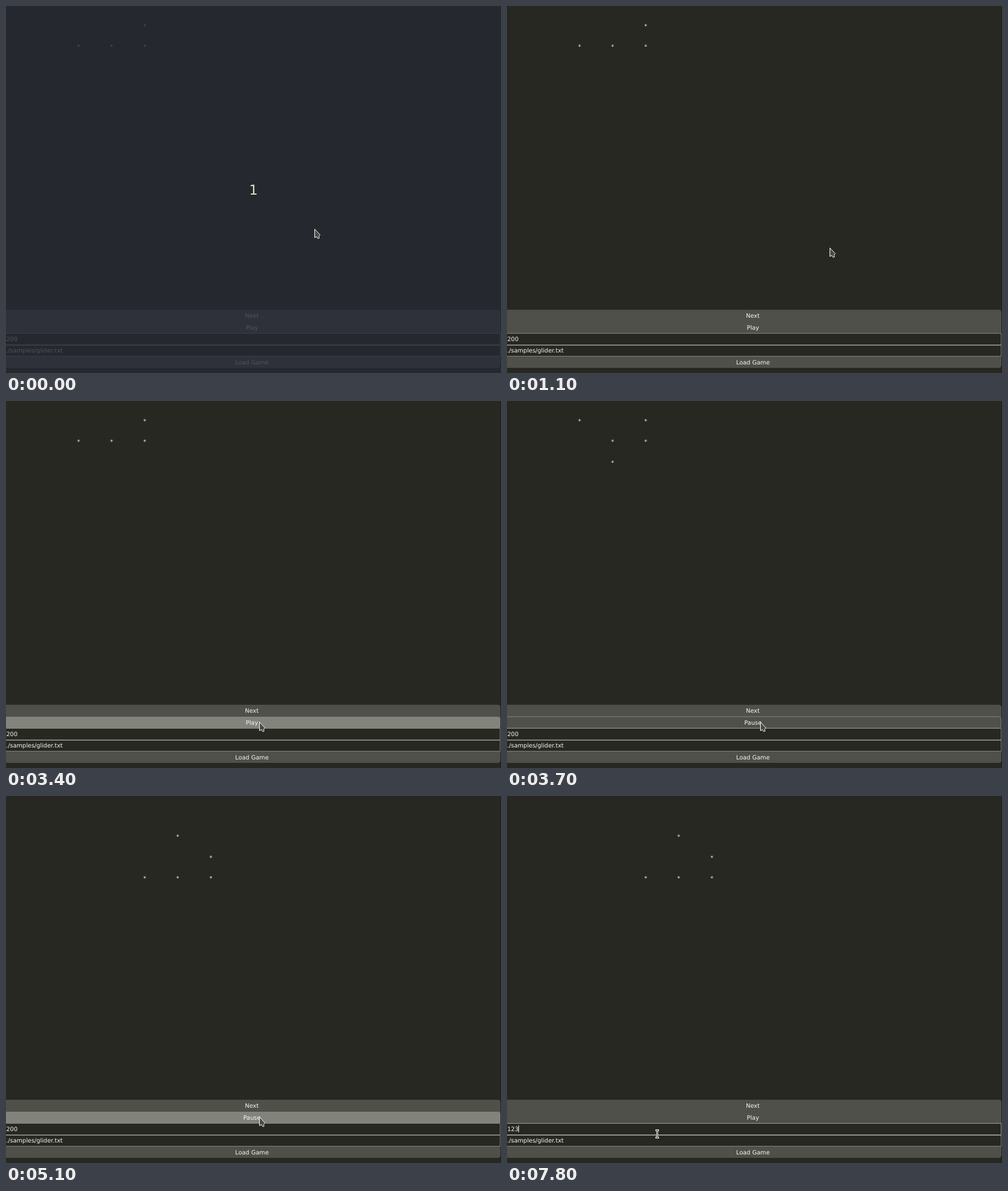
Recreate the animation shown at these times as an HTML page. Size 870 by 644 pixels, loop 8 s.

```html
<!DOCTYPE html>
<html lang="en">
<head>
<meta charset="utf-8">
<title>Game of Life</title>
<style>
  html, body { margin: 0; width: 100%; height: 100%; overflow: hidden; background: #272822; }
  svg {
    --bg: #272822; --btn: #4f504a; --line: #85867f; --fg: #f8f8f2; --edge: #1c1d19;
    display: block; width: 870px; height: 644px; background: var(--bg);
    font: 10.35px "DejaVu Sans", sans-serif; text-rendering: geometricPrecision;
  }
  svg.dim { --bg: #262830; --btn: #2e313a; --line: #3b3e46; --fg: #51545c; --edge: #262830; }
  text { fill: var(--fg); white-space: pre; }
  .mid { text-anchor: middle; }
  .btn { fill: var(--btn); }
  .entry { fill: var(--bg); stroke: var(--line); }
  .entry.hover { stroke: #a3a49c; }
  #ring { fill: none; stroke: var(--line); }
  .edge { fill: var(--edge); }
  #count { font-size: 24px; fill: #e3dfc0; display: none; }
  .dim #count { display: block; }
  #arrow { fill: #4a4b46; stroke: #fff; stroke-linejoin: round; }
</style>
</head>
<body>
<svg id="stage" viewBox="0 0 870 644">
  <rect class="edge" x="869" width="1" height="644"/>
  <g id="cells" class="mid"></g>

  <path class="btn" d="M0 533H864Q869 533 869 538V574H0Z"/>
  <rect id="press" x="-5" y="554" width="874" height="20.5" rx="4" fill="#82837b"/>
  <rect id="ring" x="-5" width="873.5" height="20" rx="4"/>
  <rect id="speed" class="entry" x="-5" y="574.5" width="873.5" height="20"/>
  <rect id="file" class="entry" x="-5" y="595.5" width="873.5" height="19"/>
  <path class="btn" d="M0 615H869V630Q869 635 864 635H0Z"/>

  <rect id="sel" y="577" width="22" height="14" fill="#82837b"/>
  <text class="mid" x="432" y="547">Next</text>
  <text id="label" class="mid" x="432.3" y="567.5"></text>
  <text id="value" x=".5" y="588"></text>
  <text x=".3" y="608">./samples/glider.txt</text>
  <text class="mid" x="432.3" y="628.7">Load Game</text>
  <rect id="caret" y="578" width="1" height="12" fill="#f8f8f2"/>

  <text id="count" class="mid" x="434.8" y="331">1</text>
  <path id="arrow" d="M.5 .5V15.5L4 13.7 6.3 17.2 8.7 16.2 7.8 13.2 10 10.5Z"/>
  <g id="beam" fill="none">
    <path d="M-3-6.5H3M-3 6.5H3M0-6.5V6.5" stroke="#fff" stroke-width="3"/>
    <path d="M-2-6.5H2M-2 6.5H2M0-6.5V6.5" stroke="#33342f"/>
  </g>
</svg>
<script>
const LOOP = 8000, STEP = 100, TICK = 200;
const PLAY = 3400, PAUSE = 5100;            // the two clicks
const SELECT = 6300, TYPE = 7500;           // in the speed field
const $ = id => document.getElementById(id);
const show = (id, on) => { $(id).style.display = on ? '' : 'none'; };
const clamp = (v, lo, hi) => Math.min(hi, Math.max(lo, v));

// Turning points of the pointer: time, x, y.
const path = [
  [200, 542, 391], [400, 518, 365], [500, 518, 365], [1100, 567, 424], [1400, 485, 507],
  [1900, 447, 560], [2100, 445, 563], [5400, 445, 563], [5600, 300, 603],
  [5900, 263, 594], [6100, 264, 593]
];

function pointer(t) {
  const i = path.findIndex(p => p[0] > t);
  if (i === 0) return path[0].slice(1);
  if (i < 0) return path[path.length - 1].slice(1);
  const [a, b] = [path[i - 1], path[i]];
  const u = (t - a[0]) / (b[0] - a[0]);
  const ease = u * u * (3 - 2 * u);
  return [1, 2].map(k => Math.round(a[k] + (b[k] - a[k]) * ease));
}

function nextGen(cells) {
  const count = {};
  for (const [c, r] of cells)
    for (let dc = -1; dc < 2; dc++)
      for (let dr = -1; dr < 2; dr++)
        if (dc || dr) {
          const key = [c + dc, r + dr];
          count[key] = (count[key] || 0) + 1;
        }
  const alive = new Set(cells.map(String));
  return Object.keys(count)
    .filter(k => count[k] === 3 || (count[k] === 2 && alive.has(k)))
    .map(k => k.split(',').map(Number));
}

const gens = [[[3, 0], [4, 1], [2, 2], [3, 2], [4, 2]]];
while (gens.length < 9) gens.push(nextGen(gens[gens.length - 1]));

// The last two generations appear together as the pause click begins.
function ageAt(t) {
  if (t >= PAUSE - STEP) return 8;
  return clamp(Math.floor((t - PLAY - STEP) / TICK), 0, 6);
}

let drawn = -1;
function drawCells(age) {
  if (age === drawn) return;
  drawn = age;
  // The top row lies above the visible area.
  $('cells').innerHTML = gens[age].filter(([, r]) => r > 0)
    .map(([c, r]) => `<text x="${11.4 + 58.1 * c}" y="${3.2 + 36.1 * r}">*</text>`).join('');
}

// Highlight strength: full at a click, half one step before and after.
const pressAt = t => Math.max(...[PLAY, PAUSE].map(c => 1 - Math.abs(t - c) / (2 * STEP)), 0);

function valueAt(t) {
  return t < TYPE ? '200' : '123'.slice(0, 1 + Math.floor((t - TYPE) / 150));
}

function render(time) {
  const t = Math.floor(time / STEP) * STEP;
  const [x, y] = pointer(t);
  const press = pressAt(t);
  const overEntry = y >= 574;
  const overNext = y >= 533 && y < 554;
  const overPlay = y >= 554 && !overEntry;

  $('stage').classList.toggle('dim', t < STEP);
  drawCells(ageAt(t));

  $('press').style.opacity = press;
  show('ring', overNext || (overPlay && !press));
  $('ring').setAttribute('y', overNext ? 533.5 : 554);
  $('speed').classList.toggle('hover', overEntry && y < 595);
  $('file').classList.toggle('hover', y >= 595);

  $('label').textContent = t > PLAY && t <= PAUSE ? 'Pause' : 'Play';
  $('value').textContent = valueAt(t);
  const selected = t >= SELECT && t < TYPE;
  show('sel', selected);
  show('caret', t >= SELECT - TICK && !selected);
  $('caret').setAttribute('x', Math.round($('value').getComputedTextLength()));

  show('arrow', !overEntry);
  show('beam', overEntry);
  $(overEntry ? 'beam' : 'arrow').setAttribute('transform', `translate(${x} ${y})`);
}

const start = performance.now();
function tick() {
  render((performance.now() - start) % LOOP);
  requestAnimationFrame(tick);
}
render(0);
requestAnimationFrame(tick);
</script>
</body>
</html>
```
